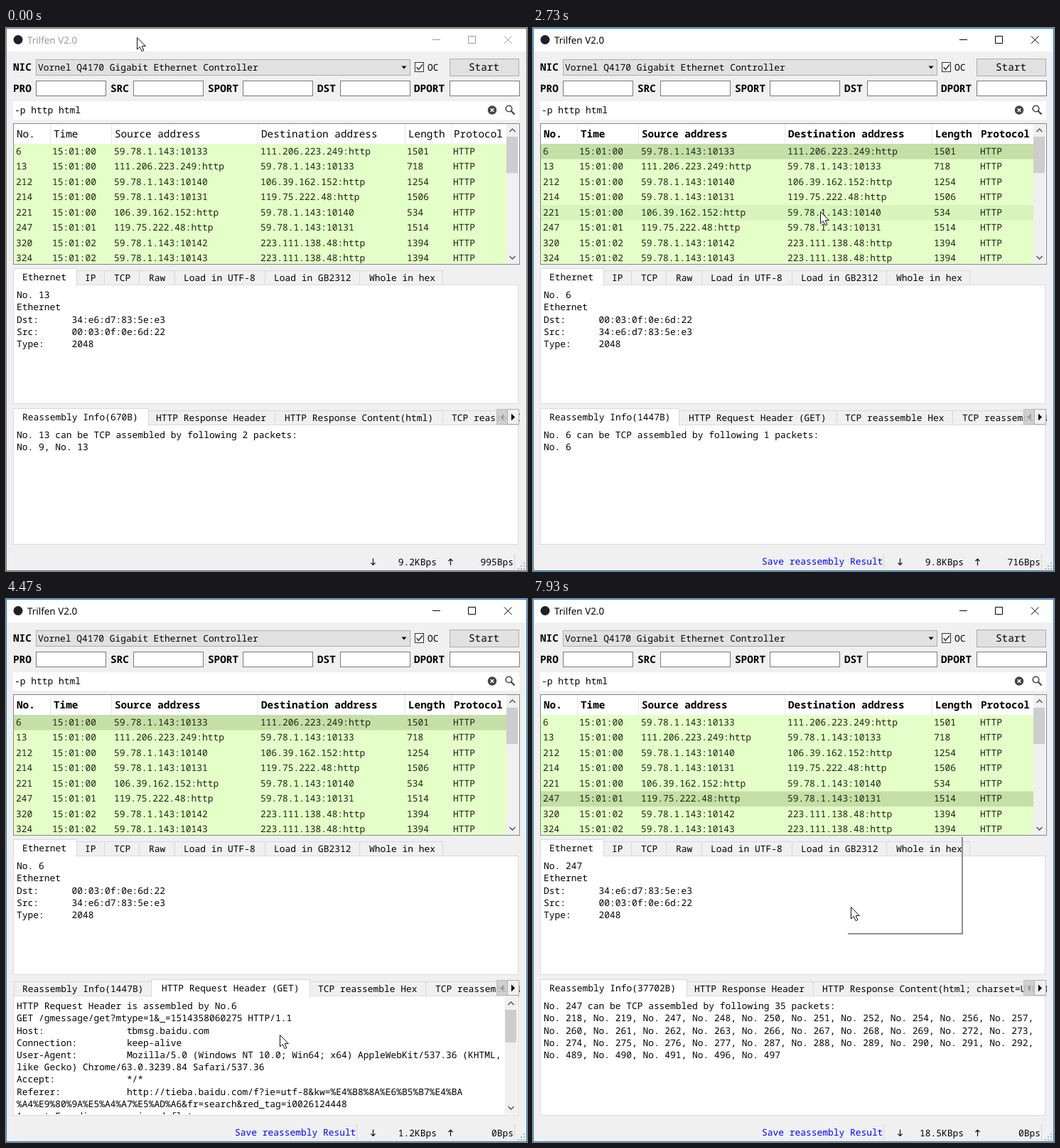
These frames come from a looping animation (733 by 764 pixels, 8 s). An HTML page:

```html
<!DOCTYPE html>
<html lang="en">
<head>
<meta charset="utf-8">
<title>Packet viewer</title>
<style>
html, body { margin: 0; width: 100%; height: 100%; overflow: hidden; background: #f0f0f0; }
svg { display: block; width: 733px; height: 764px; }
text { font-family: "Noto Sans Mono", "DejaVu Sans Mono", monospace; white-space: pre; text-rendering: geometricPrecision; }
</style>
</head>
<body>
<svg id="stage" viewBox="0 0 733 764"></svg>
<script>
const LOOP = 8000, SMALL = 12.92, BIG = 14.35, LINE = 17.2, ROW_H = 21.5, ROW_TOP = 163;
const stage = document.getElementById('stage');

// pointer keys: time, x, y
const POINTER = [
  [0, 184, 13], [70, 187, 17], [200, 205, 38], [330, 240, 70], [470, 280, 106], [600, 310, 140],
  [730, 327, 162], [870, 336, 158], [1070, 375, 86], [1200, 396, 100], [1330, 411, 150], [1470, 415, 179],
  [2600, 415, 179], [2800, 398, 300], [3000, 362, 500], [3130, 351, 553],
  [3730, 351, 553], [3870, 366, 584], [4000, 385, 613], [4600, 385, 613], [4730, 388, 601],
  [4800, 388, 601], [5130, 421, 554], [5400, 421, 554], [5470, 421, 553],
  [5670, 421, 553], [5870, 431, 370], [6000, 435, 310], [6130, 436, 307], [6270, 444, 292], [6400, 435, 282],
  [7800, 435, 282], [7870, 440, 340], [7930, 447, 433]
];

const SPEEDS = [
  [0, '9.2KBps', '995Bps'], [270, '7.0KBps', '474Bps'], [800, '8.4KBps', '612Bps'],
  [1270, '15.6KBps', '1.1KBps'], [1800, '30.3KBps', '2.0KBps'], [2330, '9.8KBps', '716Bps'],
  [2800, '3.4KBps', '354Bps'], [3330, '1.2KBps', '118Bps'], [3800, '2.3KBps', '236Bps'],
  [4330, '1.2KBps', '0Bps'], [4870, '4.6KBps', '236Bps'], [5330, '12.4KBps', '118Bps'],
  [5870, '724Bps', '0Bps'], [6400, '2.1KBps', '60Bps'], [6870, '10.7KBps', '354Bps'],
  [7400, '14.2KBps', '118Bps'], [7930, '18.5KBps', '0Bps']
];

const SCROLL = [[0, 0], [4070, 3], [4130, 6], [4270, 3], [4330, 0]];

const HEADS = [['No.', 11, 15], ['Time', 62, 67], ['Source address', 148, 153],
  ['Destination address', 354, 359], ['Length', 561, 566], ['Protocol', 626, 630]];
const CELL_X = [14, 65, 152, 358, 564, 629];
const ME = '59.78.1.143:';
const ROWS = [
  ['6', '00', ME + '10133', '111.206.223.249:http', '1501'],
  ['13', '00', '111.206.223.249:http', ME + '10133', '718'],
  ['212', '00', ME + '10140', '106.39.162.152:http', '1254'],
  ['214', '00', ME + '10131', '119.75.222.48:http', '1506'],
  ['221', '00', '106.39.162.152:http', ME + '10140', '534'],
  ['247', '01', '119.75.222.48:http', ME + '10131', '1514'],
  ['320', '02', ME + '10142', '223.111.138.48:http', '1394'],
  ['324', '02', ME + '10143', '223.111.138.48:http', '1394']
];

// tabs: left, right, text x, label
const TOP_TABS = [[11, 99, 23, 'Ethernet'], [99, 138, 111, 'IP'], [138, 187, 152, 'TCP'], [187, 237, 201, 'Raw'],
  [237, 364, 250, 'Load in UTF-8'], [364, 497, 377, 'Load in GB2312'], [497, 614, 511, 'Whole in hex']];
const MAC_A = '34:e6:d7:83:5e:e3', MAC_B = '00:03:0f:0e:6d:22';

const pad = (key, value) => key.padEnd(20) + value;
const cookie = n => Array.from({ length: 80 }, (_, i) => ((i * i * 7 + i * n) % 16).toString(16).toUpperCase()).join('');
const REQUEST = [
  'HTTP Request Header is assembled by No.6',
  'GET /gmessage/get?mtype=1&_=1514358060275 HTTP/1.1',
  pad('Host:', 'tbmsg.baidu.com'),
  pad('Connection:', 'keep-alive'),
  pad('User-Agent:', 'Mozilla/5.0 (Windows NT 10.0; Win64; x64) AppleWebKit/537.36 (KHTML,'),
  'like Gecko) Chrome/63.0.3239.84 Safari/537.36',
  pad('Accept:', '*/*'),
  pad('Referer:', 'http://tieba.baidu.com/f?ie=utf-8&kw=%E4%B8%8A%E6%B5%B7%E4%BA'),
  '%A4%E9%80%9A%E5%A4%A7%E5%AD%A6&fr=search&red_tag=i0026124448',
  pad('Accept-Encoding:', 'gzip, deflate'),
  pad('Accept-Language:', 'zh-CN,zh;q=0.9'),
  pad('Cookie:', 'BAIDUID=' + cookie(3).slice(0, 32)),
  cookie(5), cookie(9), cookie(11), cookie(13)
];

const VIEWS = {
  first: {
    no: 13, dst: MAC_A, src: MAC_B,
    tabs: [[11, 200, 23, 'Reassembly Info(670B)'], [200, 378, 211, 'HTTP Response Header'],
      [378, 614, 392, 'HTTP Response Content(html)'], [614, 800, 627, 'TCP reassemble Hex']],
    info: ['No. 13 can be TCP assembled by following 2 packets:', 'No. 9, No. 13']
  },
  request: {
    no: 6, dst: MAC_B, src: MAC_A,
    tabs: [[11, 205, 23, 'Reassembly Info(1447B)'], [205, 427, 219, 'HTTP Request Header (GET)'],
      [427, 590, 439, 'TCP reassemble Hex'], [590, 800, 604, 'TCP reassemble UTF-8']],
    info: ['No. 6 can be TCP assembled by following 1 packets:', 'No. 6']
  },
  reply: {
    no: 247, dst: MAC_A, src: MAC_B,
    tabs: [[11, 216, 23, 'Reassembly Info(37702B)'], [216, 394, 227, 'HTTP Response Header'],
      [394, 800, 407, 'HTTP Response Content(html; charset=UTF-8)']],
    info: ['No. 247 can be TCP assembled by following 35 packets:',
      'No. 218, No. 219, No. 247, No. 248, No. 250, No. 251, No. 252, No. 254, No. 256, No. 257,',
      'No. 260, No. 261, No. 262, No. 263, No. 266, No. 267, No. 268, No. 269, No. 272, No. 273,',
      'No. 274, No. 275, No. 276, No. 277, No. 287, No. 288, No. 289, No. 290, No. 291, No. 292,',
      'No. 489, No. 490, No. 491, No. 496, No. 497']
  }
};

const TIPS = [
  { from: 1800, to: 2270, x: 416, y: 196, lines: ['GET /gmessage/get?mt', 'ype=1&_=151435806027', '5 HTTP/1.1'] },
  { from: 6130, to: 6330, x: 437, y: 325,
    lines: ['GET /sys/portrait/it', 'em/ae206873686468373', '0eea6 HTTP/1.1  [TCP', 'segment of a', 'reassembled PDU]'] }
];
const REPLY_TIP = ['HTTP/1.1 200 OK', 'Connection:', 'keep-alive', 'Content-Encoding:', 'gzip', 'Content-Type:',
  'text/html;', 'charset=UTF-8  [TCP', 'segment of a', 'reassembled PDU]'];
for (const [from, to] of [[6330, 7330], [7730, 7930]]) TIPS.push({ from, to, x: 437, y: 295, lines: REPLY_TIP });

const esc = s => s.replace(/&/g, '&amp;').replace(/</g, '&lt;');
const text = (x, mid, s, size = SMALL, attrs = '') =>
  `<text x="${x}" y="${Math.round(mid + size * 0.33)}" font-size="${size}" ${attrs}>${esc(s)}</text>`;
const fill = (x, y, r, b, color) => `<rect x="${x}" y="${y}" width="${r - x}" height="${b - y}" fill="${color}"/>`;
const box = (x, y, r, b, color, edge) =>
  `<rect x="${x + 0.5}" y="${y + 0.5}" width="${r - x - 1}" height="${b - y - 1}" fill="${color}" stroke="${edge}"/>`;
const path = (d, stroke, w = 1, color = 'none') => `<path d="${d}" fill="${color}" stroke="${stroke}" stroke-width="${w}"/>`;
const block = (x, y, lines, attrs) => lines.map((s, i) => text(x, y + i * LINE, s, SMALL, attrs)).join('');
const clip = (id, body) => `<g clip-path="url(#${id})">${body}</g>`;
const inside = (p, x, y, r, b) => p.x >= x && p.x < r && p.y >= y && p.y < b;
const latest = (list, t) => list.filter(k => k[0] <= t).pop();

function pointerAt(t) {
  const i = POINTER.findIndex(k => k[0] > t);
  if (i < 0) { const k = POINTER[POINTER.length - 1]; return { x: k[1], y: k[2] }; }
  const a = POINTER[i - 1], b = POINTER[i], u = (t - a[0]) / (b[0] - a[0]);
  return { x: Math.round(a[1] + (b[1] - a[1]) * u), y: Math.round(a[2] + (b[2] - a[2]) * u) };
}

function titleBar(active) {
  const ink = active ? '#000' : '#999';
  return fill(0, 0, 733, 764, '#f0f0f0') + fill(0, 0, 733, 33, '#fff') +
    '<circle cx="17" cy="16.5" r="6.5" fill="#1f202c"/>' +
    `<text x="30" y="21.5" style="font-family:'Noto Sans',sans-serif" font-size="13.4" fill="${ink}">Trilfen V2.0</text>` +
    path('M600 16.5h11M650.5 11.5h10v10h-10zM701 11.5l10.5 10.5M711.5 11.5l-10.5 10.5', ink);
}

function controls(p) {
  const bold = 'font-weight="700"';
  const over = inside(p, 42, 44, 568, 66);
  let s = text(10, 55.5, 'NIC', BIG, bold) +
    box(42, 44, 569, 67, over ? '#e5f1fb' : '#e1e1e1', over ? '#0078d7' : '#adadad') +
    text(45, 55.5, 'Vornel Q4170 Gigabit Ethernet Controller') +
    '<path d="M556.5 53.5h7l-3.5 4z"/>' +
    box(575, 48, 588, 62, '#fff', '#333') + path('M577.5 55l3 3.5 5.5-7', '#222', 1.3) +
    text(593, 55.5, 'OC') + box(624, 43, 722, 68, '#e1e1e1', '#adadad') + text(651, 55.5, 'Start', BIG);
  [['PRO', 10, 42], ['SRC', 147, 179], ['SPORT', 284, 333], ['DST', 438, 470], ['DPORT', 574, 624]].forEach(([name, x, left]) => {
    const hot = inside(p, left, 74, left + 99, 96);
    s += text(x, 85.5, name, BIG, bold) + box(left, 74, left + 99, 96, '#fff', hot ? '#171717' : '#7a7a7a');
  });
  return s + fill(10, 103, 722, 129, '#fff') + text(12, 116, '-p http html') +
    '<circle cx="684" cy="115.5" r="6.2" fill="#444"/>' + path('M681.7 113.2l4.6 4.6M686.3 113.2l-4.6 4.6', '#fff', 1.6) +
    '<circle cx="707.5" cy="113.5" r="4.3" fill="none" stroke="#444" stroke-width="1.6"/>' + path('M710.5 116.5l5 5', '#444', 2.2);
}

const scrollBar = (x, top, bottom, t0, t1) => fill(x, top, x + 17, bottom, '#f0f0f0') + fill(x, t0, x + 16, t1, '#cdcdcd') +
  path(`M${x + 4.5} ${top + 11}l4 -4 4 4M${x + 4.5} ${bottom - 11}l4 4 4 -4`, '#505050', 1.4);

function table(p, selected) {
  let s = box(10, 134, 723, 333, '#fff', '#828790');
  HEADS.forEach(([name, left, x], i) => {
    const right = i < 5 ? HEADS[i + 1][1] : 704;
    if (inside(p, left, 135, right, 163)) s += fill(left, 135, right, 163, '#d9ebf9');
    if (i) s += fill(left, 135, left + 1, 163, '#e5e5e5');
    s += text(x, 149, name, BIG, selected < 0 ? '' : 'font-weight="700"');
  });
  let rows = '';
  ROWS.forEach(([no, sec, from, to, size], i) => {
    const y = ROW_TOP + i * ROW_H;
    const hot = inside(p, 11, y, 704, Math.min(y + ROW_H, 332));
    rows += fill(11, y, 704, y + ROW_H + 0.5, i === selected ? '#c5dfa7' : hot ? '#d8f3bc' : '#e4ffc7');
    [no, '15:01:' + sec, from, to, size, 'HTTP'].forEach((v, c) => { rows += text(CELL_X[c], y + 10.7, v, SMALL, 'fill="#1c2414"'); });
  });
  return s + clip('rows', rows) + scrollBar(704, 135, 332, 153, 204);
}

function tabPane(p, y, list, current, bottom) {
  let s = '';
  const one = ([l, r, x, name], on) => {
    const hot = !on && inside(p, l, y + 3, Math.min(r, 690), y + 23);
    return box(on ? l - 1 : l, on ? y : y + 3, r + 1, y + 25, on ? '#fff' : hot ? '#d8eaf9' : '#f0f0f0', '#d9d9d9') +
      text(x, y + (on ? 13 : 13.5), name);
  };
  list.forEach((tab, i) => { if (i !== current) s += one(tab, false); });
  s += box(10, y + 23, 721, bottom, '#fff', '#dcdcdc');
  const [l, r] = list[current];
  s += one(list[current], true) + fill(l, y + 23, r, y + 26, '#fff');
  return clip('tabs', s);
}

const tabArrows = '<g>' +
  '<rect x="690.5" y="536.5" width="15" height="21" fill="#ccc" fill-opacity=".88" stroke="#bfbfbf"/>' +
  box(705, 536, 722, 558, '#f0f0f0', '#adadad') +
  '<path d="M700 543v9l-4.5 -4.5z" fill="#999"/><path d="M711 542.5v10l5 -5z"/></g>';

function status(t, save) {
  const [, down, up] = latest(SPEEDS, t);
  const right = 'text-anchor="end"';
  let s = text(606, 751.5, down, SMALL, right) + text(714, 751.5, up, SMALL, right) +
    path('M516.5 746.5v9M513.5 752.5l3 3 3 -3M625.5 756v-9M622.5 750l3 -3 3 3', '#111', 1.2) +
    fill(715, 739, 716, 762, '#d7d7d7');
  if (save) s += text(322, 751, 'Save reassembly Result', SMALL, 'fill="#00f"') + fill(493, 739, 494, 762, '#d7d7d7');
  for (let i = 0; i < 3; i++) for (let j = 0; j <= i; j++) {
    const x = 728 - j * 4, y = 752 + i * 4;
    s += fill(x, y, x + 2, y + 2, '#b5b5b5');
  }
  return s;
}

const shadow = (x, top, r, b) => path(`M${x} ${b}H${r}V${top}`, '#909090', 2);
function tip({ x, y, lines }) {
  const h = lines.length * LINE + 2.4;
  return shadow(x + 5, y + 4, x + 167, Math.round(y + h) + 1) + box(x, y, x + 166, Math.round(y + h), '#fff', '#767676') +
    block(x + 4.5, y + 10.3, lines, 'fill="#575757"');
}

const DEFS = '<defs>' + [['rows', 11, 163, 693, 169], ['tabs', 0, 330, 723, 400], ['body', 11, 559, 709, 166]].map(
  ([id, x, y, w, h]) => `<clipPath id="${id}"><rect x="${x}" y="${y}" width="${w}" height="${h}"/></clipPath>`).join('') + '</defs>';

function draw(t) {
  const p = pointerAt(t);
  const active = t >= 2270, picked = t >= 2330, replied = t >= 7330;
  const view = replied ? VIEWS.reply : picked ? VIEWS.request : VIEWS.first;
  const header = t >= 3530 && !replied;
  const offset = header ? latest(SCROLL, t)[1] : 0;

  let s = DEFS + titleBar(active) + controls(p) + table(p, replied ? 5 : picked ? 0 : -1);
  s += tabPane(p, 338, TOP_TABS, 0, 529);
  s += block(15, 376, ['No. ' + view.no, 'Ethernet', 'Dst:'.padEnd(10) + view.dst, 'Src:'.padEnd(10) + view.src, 'Type:'.padEnd(10) + '2048']);
  s += tabPane(p, 535, view.tabs, header ? 1 : 0, 727) + tabArrows;
  s += clip('body', block(15, 573 - offset * LINE, header ? REQUEST : view.info));
  if (header) s += scrollBar(702, 560, 725, 578 + offset * 4.8, 624 + offset * 4.8);
  s += status(t, picked);
  s += `<rect x=".5" y=".5" width="732" height="763" fill="none" stroke="${active ? '#1c86d6' : '#777'}"/>`;
  TIPS.forEach(k => { if (t >= k.from && t < k.to) s += tip(k); });
  if (t >= 7930) s += shadow(443, 335, 604, 471);
  s += `<path transform="translate(${p.x + 0.5} ${p.y + 0.5})" d="M0 0V16.5L3.8 13 6.6 19.2 9.4 18 6.7 12H11.8Z" fill="#fff" stroke="#111"/>`;
  stage.innerHTML = s;
}

// the picture advances in 15 steps per second
let shown = -1;
function tick() {
  const step = Math.floor((performance.now() % LOOP + 5) * 0.015) % 120;
  if (step !== shown) {
    shown = step;
    draw(Math.round(step * 20 / 3) * 10);
  }
  requestAnimationFrame(tick);
}
tick();
</script>
</body>
</html>
```
